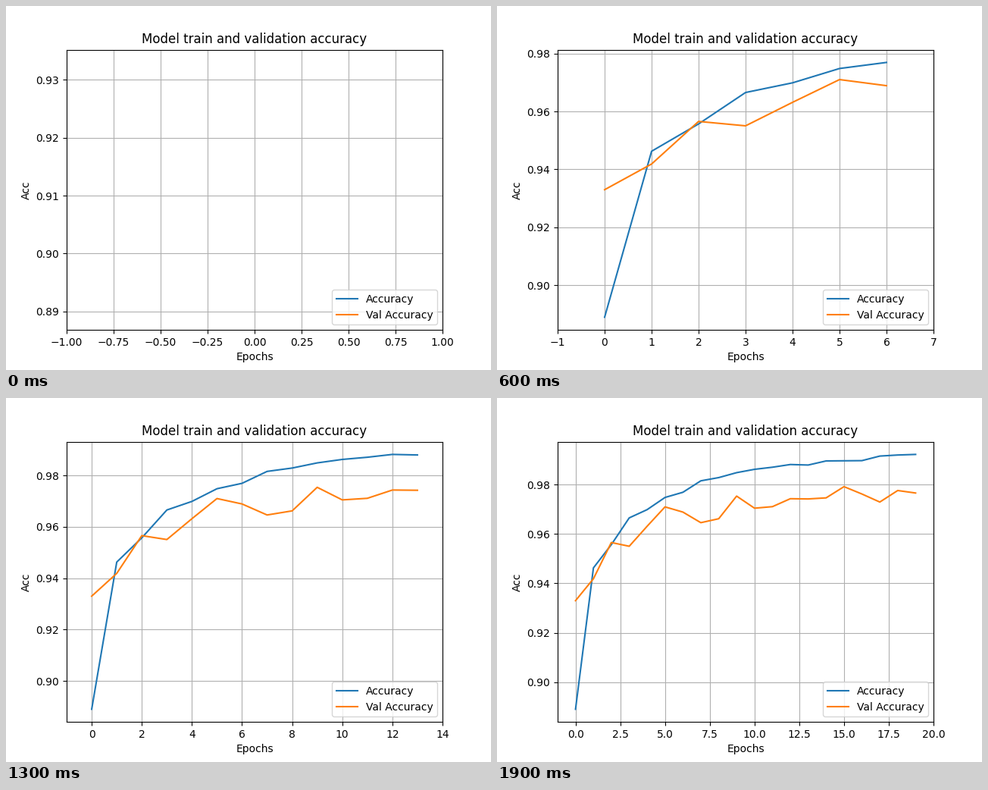
A matplotlib script that plays this animation: 640x480 px, repeating every 2000 ms.

```python
import matplotlib.pyplot as plt
from matplotlib.animation import FuncAnimation

FRAMES, INTERVAL = 20, 100

train = [0.8890, 0.94627, 0.9557, 0.96654, 0.96988, 0.97482, 0.97692,
         0.98156, 0.98287, 0.98487, 0.98622, 0.98707, 0.98817, 0.98796,
         0.98962, 0.98968, 0.98974, 0.99159, 0.99202, 0.99226]
val = [0.9330, 0.94187, 0.95656, 0.95504, 0.96315, 0.9710, 0.96889,
       0.9646, 0.9662, 0.97537, 0.97047, 0.97109, 0.97431, 0.97422,
       0.97465, 0.9792, 0.97622, 0.97296, 0.97763, 0.97662]

plt.rcParams["font.family"] = "DejaVu Sans"
fig, ax = plt.subplots(figsize=(6.4, 4.8), dpi=100)

ax.set_title("Model train and validation accuracy")
ax.set_xlabel("Epochs")
ax.set_ylabel("Acc")
ax.grid(True)
train_line, = ax.plot([], [], color="C0", label="Accuracy")
val_line, = ax.plot([], [], color="C1", label="Val Accuracy")
ax.legend(loc="lower right")


def draw(epoch):
    """Show every epoch so far and rescale the axes around them."""
    n = epoch + 1
    train_line.set_data(range(n), train[:n])
    val_line.set_data(range(n), val[:n])
    seen = train[:n] + val[:n]
    low, high = min(seen), max(seen)
    pad = 0.05 * (high - low)
    ax.set_xlim(-1, n)
    ax.set_ylim(low - pad, high + pad)
    return train_line, val_line


anim = FuncAnimation(fig, draw, frames=FRAMES, interval=INTERVAL,
                     init_func=lambda: draw(0), repeat=True, repeat_delay=0)
plt.show()
```
